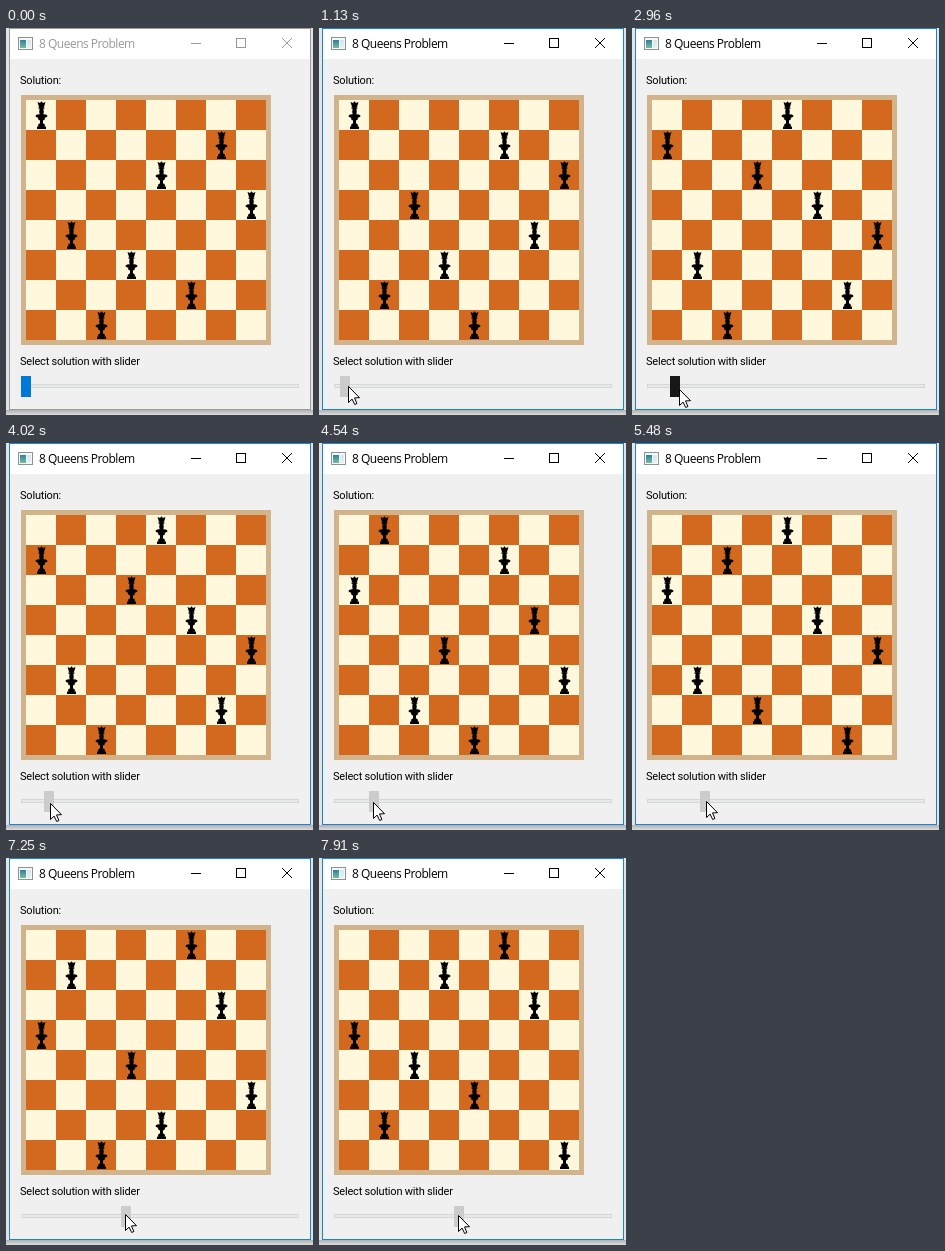
Write an HTML page with a canvas that moves like this. It is 307 by 387 pixels and loops after 8 s.

```html
<!DOCTYPE html>
<html lang="en">
<head>
<meta charset="utf-8">
<title>8 Queens Problem</title>
<style>
  html, body { margin: 0; width: 100%; height: 100%; overflow: hidden; background: #f0f0f0; }
  canvas { position: absolute; left: 0; top: 0; }
  span { position: absolute; left: 14px; white-space: nowrap; color: #000;
         font: 11px/20px Roboto, "Noto Sans", sans-serif; letter-spacing: -0.2px; }
  #title { left: 33px; top: 6px; font: 12px/20px "Open Sans", "Noto Sans", sans-serif; letter-spacing: -0.5px; }
  #label { top: 43px; }
  #hint { top: 324px; }
</style>
</head>
<body>
<canvas id="stage" width="307" height="387"></canvas>
<span id="title">8 Queens Problem</span>
<span id="label">Solution:</span>
<span id="hint">Select solution with slider</span>
<script>
const ctx = document.getElementById('stage').getContext('2d');
const title = document.getElementById('title');

const LOOP = 8000, TICK = 73.5, PHASE = 0.35;
const CELL = 30, BOARD_X = 20, BOARD_Y = 72;
const TRACK = 15, SPAN = 267;
const PRESS = 760, RELEASE = 2330, PRESS_AGAIN = 3410;

// Pointer path as time, x, y
const PATH = [
  [190, 122, 388],
  [620, 23, 358], [920, 23, 358],
  [1650, 44, 359], [1950, 47, 360],
  [3120, 47, 360.7], [3410, 43, 362],
  [3940, 43, 360], [4800, 60, 359],
  [6280, 91, 356], [7220, 119, 356],
  [7400, 119, 356], [7880, 139, 357]
];

// All placements in lexicographic order; each lists the row per column
function solve(rows = [], found = []) {
  const col = rows.length;
  if (col === 8) found.push(rows);
  else for (let r = 0; r < 8; r++) {
    if (rows.every((q, c) => q !== r && Math.abs(q - r) !== col - c)) solve([...rows, r], found);
  }
  return found;
}
const solutions = solve();
const last = solutions.length - 1;

// The pointer is sampled once per tick
function pointerAt(t) {
  const s = (Math.floor(t / TICK - PHASE) + PHASE) * TICK;
  const next = PATH.findIndex(k => k[0] > s);
  if (next === 0) return { x: PATH[0][1], y: PATH[0][2] };
  const b = next < 0 ? PATH[PATH.length - 1] : PATH[next];
  const a = next < 0 ? b : PATH[next - 1];
  const p = a === b ? 1 : (s - a[0]) / (b[0] - a[0]);
  return { x: Math.round(a[1] + (b[1] - a[1]) * p), y: Math.round(a[2] + (b[2] - a[2]) * p) };
}

const handleX = index => TRACK + Math.round(index * SPAN / last);

// Slider value while dragged; the grip is where the handle was caught
function dragged(t, grip) {
  const i = Math.round((pointerAt(t).x - grip - TRACK) * last / SPAN);
  return Math.max(0, Math.min(last, i));
}

function indexAt(t) {
  if (t < PRESS) return 0;
  if (t < PRESS_AGAIN) return dragged(Math.min(t, RELEASE), 8);
  return dragged(t, 5);
}

function rect(x, y, w, h, color) {
  ctx.fillStyle = color;
  ctx.fillRect(x, y, w, h);
}

function fade(x, y, w, h, from, to) {
  const g = ctx.createLinearGradient(0, y, 0, y + h);
  g.addColorStop(0, from);
  g.addColorStop(1, to);
  rect(x, y, w, h, g);
}

function poly(points) {
  ctx.beginPath();
  points.forEach(([x, y]) => ctx.lineTo(x, y));
  ctx.closePath();
}

function oval(y, rx, ry) {
  ctx.beginPath();
  ctx.ellipse(0, y, rx, ry, 0, 0, 2 * Math.PI);
  ctx.fill();
}

function drawIcon() {
  rect(12, 9, 15, 13, '#8a9398');
  rect(13, 10, 13, 11, '#f6f8f9');
  fade(14, 12, 6, 8, '#2f7fa5', '#74bd98');
  fade(21, 12, 4, 8, '#d3e6f0', '#e6f2ee');
}

function drawWindow(active) {
  const ink = active ? '#000' : '#999';
  rect(0, 0, 307, 387, '#e4e4e4');
  fade(0, 382, 307, 5, '#b0b0b0', '#dcdcdc');
  rect(3, 0, 302, 382, active ? '#1883d7' : '#9a9a9a');
  rect(4, 1, 300, 30, '#fff');
  rect(4, 31, 300, 350, '#f0f0f0');
  drawIcon();

  rect(185, 15, 10, 1, ink);
  ctx.strokeStyle = ink;
  ctx.lineWidth = 1;
  ctx.strokeRect(230.5, 10.5, 9, 9);
  ctx.beginPath();
  ctx.moveTo(276, 10); ctx.lineTo(286, 20);
  ctx.moveTo(286, 10); ctx.lineTo(276, 20);
  ctx.stroke();
  title.style.color = ink;
}

function drawQueen(col, row) {
  ctx.save();
  ctx.translate(BOARD_X + col * CELL + 15.5, BOARD_Y + row * CELL);
  ctx.fillStyle = '#000';
  poly([[-4, 2], [-1.5, 3], [0, 1.2], [1.5, 3], [4, 2], [2.5, 7], [-2.5, 7]]);
  ctx.fill();
  oval(8, 3.2, 1.1);
  oval(11.5, 2.2, 4);
  oval(16, 6, 2);
  oval(18.5, 3.4, 2);
  ctx.fillRect(-1.5, 18, 3, 8);
  oval(25.5, 3.4, 2.2);
  ctx.fillRect(-4.5, 26.5, 9, 2.5);
  ctx.restore();
}

function drawBoard(rows) {
  rect(15, 67, 250, 250, '#d2b48c');
  for (let i = 0; i < 64; i++) {
    const c = i % 8, r = i >> 3;
    rect(BOARD_X + c * CELL, BOARD_Y + r * CELL, CELL, CELL, (c + r) % 2 ? '#d2691e' : '#fff8dc');
  }
  rows.forEach((r, c) => drawQueen(c, r));
}

function drawSlider(x, color) {
  rect(TRACK, 356, 278, 4, '#d6d6d6');
  rect(TRACK + 1, 357, 276, 2, '#e7eaea');
  rect(x, 348, 10, 21, color);
}

function drawPointer({ x, y }) {
  ctx.save();
  ctx.translate(x + 0.5, y + 0.5);
  poly([[0, 0], [0, 16], [3.6, 12.6], [6.2, 18], [8.4, 17], [6, 11.4], [11, 11.2]]);
  ctx.fillStyle = '#fff';
  ctx.fill();
  ctx.strokeStyle = '#000';
  ctx.lineWidth = 1;
  ctx.stroke();
  ctx.restore();
}

function draw(t) {
  const p = pointerAt(t), i = indexAt(t), x = handleX(i);
  const pressed = (t >= PRESS && t < RELEASE) || t >= PRESS_AGAIN;
  const hover = p.x >= x && p.x < x + 10;
  drawWindow(t >= PRESS);
  drawBoard(solutions[i]);
  drawSlider(x, pressed ? '#cccccc' : hover ? '#171717' : '#0078d7');
  drawPointer(p);
}

const began = performance.now();
function tick() {
  draw((performance.now() - began) % LOOP);
  requestAnimationFrame(tick);
}
tick();
</script>
</body>
</html>
```
